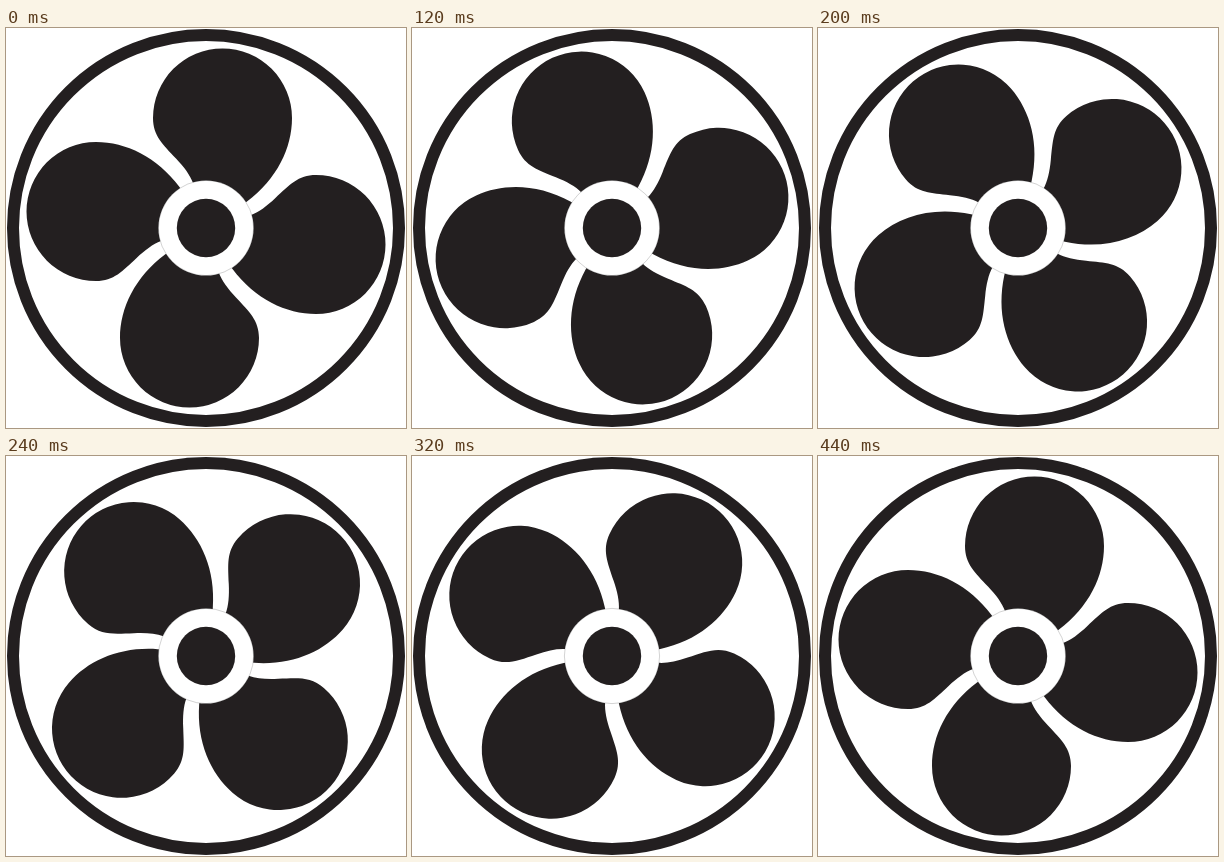
An HTML page for the animation above (480 ms loop, 400x400 px).

```html
<!DOCTYPE html>
<html lang="en">
<head>
<meta charset="utf-8">
<title>Fan</title>
<style>
  html, body { margin: 0; width: 100%; height: 100%; overflow: hidden; background: #fff; }
  svg { display: block; width: 100%; height: 100%; }
</style>
</head>
<body>
<svg viewBox="-200 -200 400 400" fill="#231f20">
  <defs>
    <path id="blade" d="M-10-36L-13-45C-16-53-22-61-30-69.4C-43-83.5-53-92-53-110A69.5 69.5 0 0 1 86-110C86-80 71-49 41-26.5L30-19Z"/>
  </defs>
  <circle r="193" fill="none" stroke="#231f20" stroke-width="12"/>
  <g id="rotor">
    <use href="#blade"/>
    <use href="#blade" transform="rotate(90)"/>
    <use href="#blade" transform="rotate(180)"/>
    <use href="#blade" transform="rotate(270)"/>
  </g>
  <circle r="47.6" fill="#fff" stroke="#231f20" stroke-width=".2"/>
  <circle r="29.2"/>
</svg>
<script>
  const STEP_MS = 40, STEPS = 12;
  const rotor = document.getElementById('rotor');
  const start = performance.now();

  // A quarter turn in 11 steps; the last pose equals the first, so it rests for two steps.
  function draw() {
    const step = Math.floor((performance.now() - start) / STEP_MS) % STEPS;
    rotor.setAttribute('transform', `rotate(${-90 * step / (STEPS - 1)})`);
    requestAnimationFrame(draw);
  }
  draw();
</script>
</body>
</html>
```
